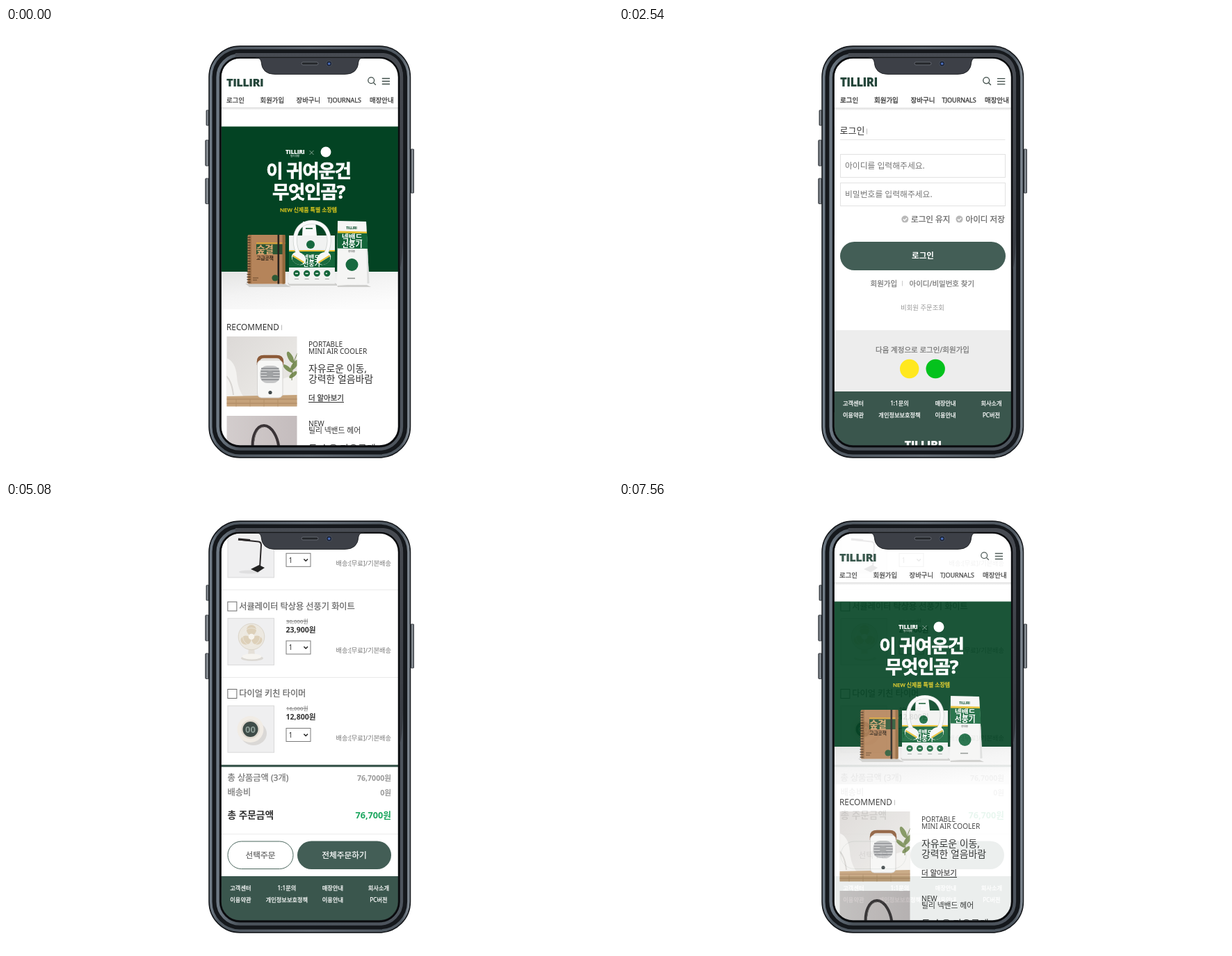
An HTML page for the animation above (7620 ms loop, 873 by 642 pixels).

```html
<!DOCTYPE html>
<html lang="ko">
<head>
<meta charset="utf-8">
<title>Mobile shop screens</title>
<style>
  html, body { margin: 0; width: 100%; height: 100%; overflow: hidden; background: #fff; }
  svg { display: block; width: 873px; height: 642px; }
  text { font-family: 'Noto Sans', 'Noto Sans CJK KR', 'Noto Sans CJK JP', sans-serif; color: #333; fill: currentColor; }
  .logo { font-family: 'Open Sans', 'Noto Sans', sans-serif; font-weight: 800; font-stretch: 75%; }
  .m text, text.m { stroke: currentColor; stroke-width: .25; }
  .b { font-weight: 700; }
  .k { font-weight: 900; }
  .k text { stroke: currentColor; stroke-width: .7; }
  .mid { text-anchor: middle; }
  .end { text-anchor: end; }
  .white { color: #fff; }
  .dim { color: #666; }
  .grey { color: #777; }
  .pale { color: #999; }

  /* Each fade moves in 60 ms steps */
  #login { animation: login 7.62s infinite; }
  #cart { animation: cart 7.62s infinite; }
  @keyframes login {
    0% { opacity: 0; animation-timing-function: step-end; }
    26.24% { opacity: 0; animation-timing-function: steps(10, start); }
    34.114% { opacity: 1; animation-timing-function: step-end; }
    80%, 100% { opacity: 0; }
  }
  @keyframes cart {
    0% { opacity: 0; animation-timing-function: step-end; }
    59.575% { opacity: 0; animation-timing-function: steps(10, start); }
    67.449% { opacity: 1; animation-timing-function: step-end; }
    92.908% { opacity: 1; animation-timing-function: steps(9, start); }
    100% { opacity: .1; }
  }
</style>
</head>
<body>
<svg viewBox="0 0 873 642">
  <defs>
    <clipPath id="glass"><rect x="309.5" y="43.5" width="255" height="556.5" rx="27"/></clipPath>
    <clipPath id="shot1"><rect x="317.5" y="443" width="101" height="100.5"/></clipPath>
    <linearGradient id="metal">
      <stop offset="0" stop-color="#707b86"/><stop offset=".04" stop-color="#4d565f"/>
      <stop offset=".5" stop-color="#626a73"/><stop offset=".96" stop-color="#4d565f"/>
      <stop offset="1" stop-color="#7c858e"/>
    </linearGradient>
    <linearGradient id="bezel">
      <stop offset="0" stop-color="#6d7883"/><stop offset=".12" stop-color="#4a525a"/>
      <stop offset="1" stop-color="#4d545d"/>
    </linearGradient>
    <linearGradient id="glare" x1="0" x2="0" y1="0" y2="1">
      <stop offset="0" stop-color="#474b52"/><stop offset="1" stop-color="#383c43"/>
    </linearGradient>
    <linearGradient id="key">
      <stop offset="0" stop-color="#3b4046"/><stop offset=".5" stop-color="#9aa0a6"/><stop offset="1" stop-color="#3b4046"/>
    </linearGradient>
    <linearGradient id="drop" x1="0" x2="0" y1="0" y2="1">
      <stop offset="0" stop-color="#dadada"/><stop offset="1" stop-color="#fff"/>
    </linearGradient>
    <linearGradient id="floor" x1="0" x2=".6" y1="0" y2="1">
      <stop offset="0" stop-color="#e4e4e3"/><stop offset=".5" stop-color="#f3f3f3"/><stop offset="1" stop-color="#fcfcfc"/>
    </linearGradient>
    <linearGradient id="wall" x1="0" x2="1" y1="0" y2="1">
      <stop offset="0" stop-color="#dcd9d7"/><stop offset=".6" stop-color="#e8e6e3"/><stop offset="1" stop-color="#e0dcd8"/>
    </linearGradient>
    <linearGradient id="mauve">
      <stop offset="0" stop-color="#d3cdcd"/><stop offset="1" stop-color="#c4bcbd"/>
    </linearGradient>

    <g id="header">
      <rect x="300" y="40" width="275" height="75" fill="#fff"/>
      <rect x="300" y="114" width="275" height="4" fill="url(#drop)"/>
      <text class="logo" x="317" y="83.7" font-size="16.5" letter-spacing="-.6" style="color:#24463a">TILLIRI</text>
      <g fill="none" stroke="#3d4b47" stroke-width="1.3">
        <circle cx="525.2" cy="75.2" r="4.4"/>
        <path d="M528.4 78.4l3.4 3.4M540.8 72.5h11.2M540.8 76.5h11.2M540.8 80.5h11.2"/>
      </g>
      <g class="m" font-size="9.4">
        <text x="317" y="106.5">로그인</text>
        <text x="365.5" y="106.5">회원가입</text>
        <text x="417.5" y="106.5">장바구니</text>
        <text x="462" y="106.5" font-size="9">TJOURNALS</text>
        <text x="523" y="106.5">매장안내</text>
      </g>
    </g>

    <g id="footer">
      <rect x="300" y="522" width="275" height="100" fill="#3a564d"/>
      <g class="mid m" font-size="8.2">
        <text class="white" x="337" y="541.7">고객센터</text>
        <text class="white" x="403.5" y="541.7">1:1문의</text>
        <text class="white" x="469.5" y="541.7">매장안내</text>
        <text class="white" x="535.5" y="541.7">회사소개</text>
        <text class="white" x="337" y="559.2">이용약관</text>
        <text class="white" x="403.5" y="559.2">개인정보보호정책</text>
        <text class="white" x="469.5" y="559.2">이용안내</text>
        <text class="white" x="535.5" y="559.2">PC버전</text>
      </g>
    </g>

    <g id="check">
      <circle r="5" fill="#b9b9b9"/>
      <path d="M-2.5 0l2 2 3.2-3.6" fill="none" stroke="#fff" stroke-width="1.4"/>
    </g>

    <g id="item">
      <rect x="318.9" y="142" width="13" height="13" fill="#fff" stroke="#6b6b6b"/>
      <rect x="319" y="165.7" width="66.5" height="67" fill="#efeff0" stroke="#d9d9d9"/>
      <rect x="403" y="198" width="35" height="19" fill="#fff" stroke="#7a7a7a"/>
      <text x="406.5" y="211.3" font-size="10">1</text>
      <path d="M428.4 206.2l2.8 2.8 2.8-2.8" fill="none" stroke="#222" stroke-width="1.5"/>
      <text class="end grey" x="554" y="215.3" font-size="9.2">배송:[무료]/기본배송</text>
      <path d="M300 250.5h275" stroke="#e9e9e9"/>
    </g>
  </defs>

  <g clip-path="url(#glass)">
    <g id="home">
      <rect x="300" y="40" width="275" height="570" fill="#fff"/>
      <use href="#header"/>

      <rect x="300" y="141.5" width="275" height="210" fill="#034323"/>
      <rect x="300" y="350" width="275" height="54" fill="url(#floor)"/>
      <text class="logo white" x="402" y="181" font-size="8.5" letter-spacing="-.3">TILLIRI</text>
      <text class="mid white" x="415.5" y="185.3" font-size="3.6">틸리생활</text>
      <path d="M436.5 176l6 6m0-6l-6 6" stroke="#a9bfb2" stroke-width=".8"/>
      <circle cx="460" cy="178" r="7.5" fill="#fff"/>
      <g class="mid k" font-size="26.5" letter-spacing="-1.2">
        <text class="white" x="435" y="215.3">이 귀여운건</text>
        <text class="white" x="435" y="245.3">무엇인곰?</text>
      </g>
      <text class="mid m" x="435" y="263.7" font-size="7.9" style="color:#f2d51d">NEW 신제품 특별 소장템</text>

      <!-- notebook -->
      <path d="M344 367l58 1 8 4h-60z" fill="#cfcfcd"/>
      <rect x="347.5" y="297" width="54" height="70.5" rx="2" fill="#b5845a"/>
      <rect x="349" y="297" width="4" height="70" fill="#9f7047"/>
      <path d="M349 300v66" stroke="#4b3523" stroke-width="5" stroke-dasharray="1.2 2.6"/>
      <rect x="360" y="308" width="41.5" height="2" fill="#d9a53a"/>
      <rect x="360" y="310.5" width="41.5" height="14.5" fill="#2a5633"/>
      <text class="b" x="360" y="323" font-size="14" letter-spacing="-.8" style="color:#dba873">숲결</text>
      <text class="b" x="360" y="333" font-size="7" letter-spacing="-.3" style="color:#35271a">고급공책</text>
      <rect x="390.5" y="297" width="2.6" height="70.5" fill="#27231f"/>
      <rect x="397.5" y="297" width="4" height="70.5" fill="#94683c"/>
      <circle cx="387" cy="359" r="4.6" fill="#2c5a36"/>
      <path d="M355 359h8m-8 3h6" stroke="#6b4a2c"/>

      <!-- neckband box -->
      <path d="M405 366h68l6 4h-72z" fill="#cfcfcd"/>
      <path d="M407 298h66v69.5h-66z" fill="#f1f2f1"/>
      <path d="M427 278h18l2 20h-21z" fill="#fafafa"/>
      <rect x="431" y="287" width="10" height="1.8" fill="#2c6b46"/>
      <circle cx="438" cy="311" r="6" fill="#17693f"/>
      <rect x="407" y="321" width="66" height="23" fill="#14663a"/>
      <rect x="407" y="319" width="66" height="2" fill="#e8bf2f"/>
      <g class="b" font-size="9">
        <text class="white" x="427" y="333">넥밴드</text>
        <text class="white" x="427" y="342">선풍기</text>
      </g>
      <g fill="none" stroke-linecap="round">
        <path d="M423 330C408 302 418 279 440 279S473 302 457 330" stroke="#cdd2cf" stroke-width="6"/>
        <path d="M423 330C408 302 418 279 440 279S473 302 457 330" stroke="#fafafa" stroke-width="4.4"/>
      </g>
      <g id="pad" transform="translate(421 331) rotate(32)">
        <ellipse rx="11" ry="8.5" fill="#f7f7f5"/>
        <path d="M-9 2h18a9 6.5 0 0 1-18 0z" fill="#1b6b3f"/>
        <rect x="-9.5" width="19" height="2" fill="#e8bf2f"/>
      </g>
      <use href="#pad" transform="matrix(-1 0 0 1 878 0)"/>
      <path d="M418 352.5h44" stroke="#14663a" stroke-width="9.2" stroke-linecap="round" stroke-dasharray="0 14.6"/>
      <path d="M416 352.5h46" stroke="#fff" stroke-width="1.5" stroke-dasharray="4 10.6"/>
      <path d="M415 360.5h50" stroke="#a0a8a3" stroke-dasharray="6 8.6"/>

      <!-- tall box -->
      <path d="M476 369h43l6 3h-48z" fill="#cfcfcd"/>
      <path d="M477 277l41 1 4.500 88.500-46.500 3.500z" fill="#f5f5f4"/>
      <path d="M518 278l1.500 89 3-.5z" fill="#dcdddc"/>
      <text class="logo mid" x="497" y="288.500" font-size="4.500" style="color:#17593a">TILLIRI</text>
      <path d="M477 291.500l42 1v3h-42z" fill="#e8bf2f"/>
      <path d="M477 294.500l42.500.5.8 22-43.500-.5z" fill="#14663a"/>
      <g class="mid b" font-size="11" letter-spacing="-.3">
        <text class="white" x="497.500" y="304.500">넥밴드</text>
        <text class="white" x="497.500" y="315">선풍기</text>
      </g>
      <text class="mid" x="497" y="322" font-size="3.600">휴대용</text>
      <circle cx="497.500" cy="340" r="9" fill="#17693f"/>
      <path d="M491 359.500h11" stroke="#8b918d" stroke-width="1.500"/>

      <text x="317" y="434.300" font-size="11.800">RECOMMEND</text>
      <path d="M396.500 426.500v7.500" stroke="#bbb"/>

      <!-- cooler photo -->
      <g clip-path="url(#shot1)">
        <rect x="317" y="443" width="102" height="101" fill="url(#wall)"/>
        <path d="M317 474q13 5 15 26 1 18 10 30l-25 4z" fill="#f3f2f0"/>
        <path d="M317 500q8 8 10 27" fill="none" stroke="#d8d5d2" stroke-width="2"/>
        <path d="M394 505l25-8v33h-24z" fill="#f4f3f1"/>
        <g fill="#7d9159">
          <ellipse cx="409" cy="473" rx="3.500" ry="9" transform="rotate(-28 409 473)"/>
          <ellipse cx="415" cy="484" rx="3.500" ry="9" transform="rotate(36 415 484)"/>
          <ellipse cx="405" cy="489" rx="3" ry="8" transform="rotate(-50 405 489)"/>
          <ellipse cx="413" cy="498" rx="3" ry="7" transform="rotate(50 413 498)"/>
        </g>
        <path d="M419 467q-8 16-8 39" fill="none" stroke="#6f7f4e"/>
        <path d="M317 529l102-2v17H317z" fill="#c5a27a"/>
        <path d="M317 533h102M317 539h102" stroke="#ab8560"/>
        <path d="M331 533v11m20-11v11m20-11v11m20-11v11" stroke="#b39068"/>
        <path d="M363 484v-5q0-7 8-7h18q8 0 8 7v5" fill="none" stroke="#8c5a38" stroke-width="4.500"/>
        <rect x="361.500" y="477" width="36.500" height="54" rx="6" fill="#f7f7f6" stroke="#d5d3d1"/>
        <rect x="365.500" y="485" width="28.500" height="25" rx="10" fill="#c4c5c6"/>
        <path d="M367 489h25.500m-26 4h27m-27 4h27m-27 4h27m-26 4h25" stroke="#85888b" stroke-width="1.300"/>
        <circle cx="379.700" cy="497" r="5" fill="#a0a2a4"/>
        <circle cx="380" cy="523.500" r="2.600" fill="#40484a"/>
      </g>
      <g font-size="10.100">
        <text x="435" y="457.800">PORTABLE</text>
        <text x="435" y="467.900">MINI AIR COOLER</text>
        <text x="435" y="572">NEW</text>
        <text x="435" y="581.800" font-size="10.800">틸리 넥밴드 헤어</text>
      </g>
      <g font-size="13.900">
        <text x="435" y="493.700">자유로운 이동,</text>
        <text x="435" y="508.900">강력한 얼음바람</text>
        <text x="435" y="608.500">두 손을 자유롭게</text>
      </g>
      <text class="m" x="435" y="535" font-size="10.500">더 알아보기</text>
      <path d="M435 537.500h51" stroke="#333"/>

      <!-- headband photo -->
      <rect x="317.500" y="557" width="101" height="50" fill="url(#mauve)"/>
      <path d="M356 612c-5-26 5-41 15-41s22 15 22 41" fill="none" stroke="#393336" stroke-width="4"/>
      <path d="M357 594c1-13 7-21 14-21" fill="none" stroke="#77706f"/>
    </g>

    <g id="login">
      <rect x="300" y="40" width="275" height="570" fill="#fff"/>
      <use href="#header" transform="matrix(1.01 0 0 1.01 -2.2 -.6)"/>
      <text x="317.500" y="152" font-size="13">로그인</text>
      <path d="M356.500 144.500v8" stroke="#bbb"/>
      <path d="M318 160.500h237.500" stroke="#e6e6e6"/>
      <g fill="#fff" stroke="#e2e2e2">
        <rect x="318.500" y="181.500" width="237" height="33"/>
        <rect x="318.500" y="222.500" width="237" height="33"/>
      </g>
      <g font-size="11.800">
        <text class="grey" x="325" y="202.300">아이디를 입력해주세요.</text>
        <text class="grey" x="325" y="243.200">비밀번호를 입력해주세요.</text>
      </g>
      <use href="#check" x="411.300" y="274.600"/>
      <use href="#check" x="489.500" y="274.600"/>
      <g class="m" font-size="11.600">
        <text class="dim" x="420" y="279">로그인 유지</text>
        <text class="dim" x="498.500" y="279">아이디 저장</text>
      </g>
      <rect x="318" y="307" width="238" height="41" rx="20.500" fill="#435e56"/>
      <text class="white mid b" x="437" y="331.300" font-size="11.600">로그인</text>
      <g class="m" font-size="10.500">
        <text class="grey" x="361.500" y="370.700">회원가입</text>
        <text class="grey" x="417.500" y="370.700">아이디/비밀번호 찾기</text>
      </g>
      <path d="M407.500 363v7.500" stroke="#ccc"/>
      <text class="mid pale" x="436.500" y="405" font-size="9.400">비회원 주문조회</text>
      <rect x="300" y="434" width="275" height="88" fill="#ededed"/>
      <text class="grey mid m" x="436.500" y="465.700" font-size="10.500">다음 계정으로 로그인/회원가입</text>
      <circle cx="417.700" cy="489.500" r="13.700" fill="#ffe81f"/>
      <circle cx="455.200" cy="489.500" r="13.700" fill="#04c21d"/>
      <use href="#footer"/>
      <text class="logo white" x="410.500" y="603.500" font-size="16.500" letter-spacing="-.6">TILLIRI</text>
    </g>

    <g id="cart">
      <rect x="300" y="40" width="275" height="570" fill="#fff"/>
      <use href="#item" y="-125.700"/>
      <use href="#item"/>
      <use href="#item" y="125.500"/>

      <!-- lamp -->
      <ellipse cx="350" cy="99" rx="15" ry="2.500" fill="#dfdfe0"/>
      <path d="M334 52.500l29 3q4 .5 4 5l-2 33" fill="none" stroke="#2a2728" stroke-width="2"/>
      <path d="M334 52l17 1.500" stroke="#2a2728" stroke-width="3"/>
      <path d="M352 95l12-6 8 4-10 6.500z" fill="#222"/>

      <!-- fan -->
      <ellipse cx="354" cy="223" rx="16" ry="4" fill="#dcd9d4"/>
      <path d="M349 208h8l1 11h-10z" fill="#e5e0d8"/>
      <ellipse cx="353.500" cy="220.500" rx="14" ry="4" fill="#f6f4f0"/>
      <circle cx="353" cy="192" r="18.800" fill="#ece8e0" stroke="#dbd5ca"/>
      <g fill="#ddd0b9">
        <ellipse cx="353" cy="182.500" rx="7" ry="7.500"/>
        <ellipse cx="345" cy="197" rx="7.500" ry="6.500"/>
        <ellipse cx="361" cy="197" rx="7.500" ry="6.500"/>
      </g>
      <circle cx="353" cy="192" r="12.500" fill="none" stroke="#efece6" stroke-width=".7"/>
      <circle cx="353" cy="192" r="4.300" fill="#f7f4ee"/>

      <!-- timer -->
      <ellipse cx="356" cy="331" rx="19" ry="17" fill="#dad8d6"/>
      <circle cx="351.500" cy="325" r="19" fill="#f1ece5"/>
      <circle cx="351.500" cy="325" r="13.500" fill="#e2dbd1"/>
      <circle cx="351.500" cy="325" r="11" fill="#3f4c48"/>
      <text class="mid b" x="351.500" y="329.700" font-size="13" style="color:#8d9e97">00</text>

      <g class="m" font-size="12.200">
        <text class="dim" x="335.300" y="152.700">서큘레이터 탁상용 선풍기 화이트</text>
        <text class="dim" x="335.300" y="278.200">다이얼 키친 타이머</text>
        <text class="grey" x="318.500" y="399.300">총 상품금액 (3개)</text>
        <text class="grey" x="318.500" y="420">배송비</text>
      </g>
      <g font-size="7.800">
        <text class="grey" x="403" y="172.500">30,000원</text>
        <text class="grey" x="403" y="298">16,000원</text>
        <path d="M403 169.700h31M403 295.200h31" stroke="#777" stroke-width=".8"/>
      </g>
      <g class="b" font-size="10.600">
        <text x="402.500" y="185.700">23,900원</text>
        <text x="402.500" y="311.200">12,800원</text>
        <text class="end pale" x="554" y="399">76,7000원</text>
        <text class="end pale" x="554" y="419.700">0원</text>
      </g>
      <rect x="300" y="376" width="275" height="3.200" fill="#3c594f"/>
      <text class="b" x="318.500" y="452.500" font-size="13.700">총 주문금액</text>
      <text class="b end" x="554" y="452.500" font-size="12.700" style="color:#1ba65e">76,700원</text>
      <path d="M300 475.500h275" stroke="#ececec"/>
      <rect x="319" y="486" width="94" height="39.500" rx="19.700" fill="#fff" stroke="#4b665d"/>
      <rect x="419" y="485.500" width="135" height="40.500" rx="20.200" fill="#435e56"/>
      <g class="mid m" font-size="11.700">
        <text class="dim" x="366" y="510">선택주문</text>
        <text class="white" x="486.500" y="510">전체주문하기</text>
      </g>
      <use href="#footer" x=".4" y="14"/>
    </g>
  </g>

  <!-- phone -->
  <g fill="url(#key)" stroke="#2a2e33" stroke-width=".8">
    <rect x="288" y="118" width="4" height="22" rx="1"/>
    <rect x="286.800" y="161" width="5" height="37" rx="1"/>
    <rect x="286.800" y="216" width="5" height="36.500" rx="1"/>
    <rect x="582" y="174" width="4.600" height="63" rx="1"/>
  </g>
  <g fill="none">
    <rect x="300.500" y="34.500" width="272.500" height="574" rx="36" stroke="#15181c" stroke-width="18.500"/>
    <rect x="294.700" y="28.800" width="284.200" height="585.400" rx="41.500" stroke="url(#metal)" stroke-width="3.600"/>
    <rect x="304.600" y="38.800" width="264.300" height="565.800" rx="32" stroke="url(#bezel)" stroke-width="4.400"/>
  </g>
  <path d="M330 36h213c19 2 28 16 28 34v230q-1 36-5 48V72c0-17-10-29-27-30H330z" fill="url(#glare)"/>
  <rect x="308.600" y="42.600" width="256.800" height="558.300" rx="28" fill="none" stroke="#08090b" stroke-width="1.800"/>
  <path d="M359 42.500q7 0 8 6 1 18 20 18h100q19 0 20-18 1-6 8-6z" fill="#3d4047" stroke="#16181b" stroke-width=".8"/>
  <rect x="425" y="49" width="24" height="4" rx="2" fill="#24262a" stroke="#777c84" stroke-width=".7"/>
  <circle cx="464.700" cy="51.200" r="4" fill="#1b2234" stroke="#59606c" stroke-width=".7"/>
  <circle cx="464.700" cy="51.200" r="1.800" fill="#4a6ebb"/>
</svg>
</body>
</html>
```
